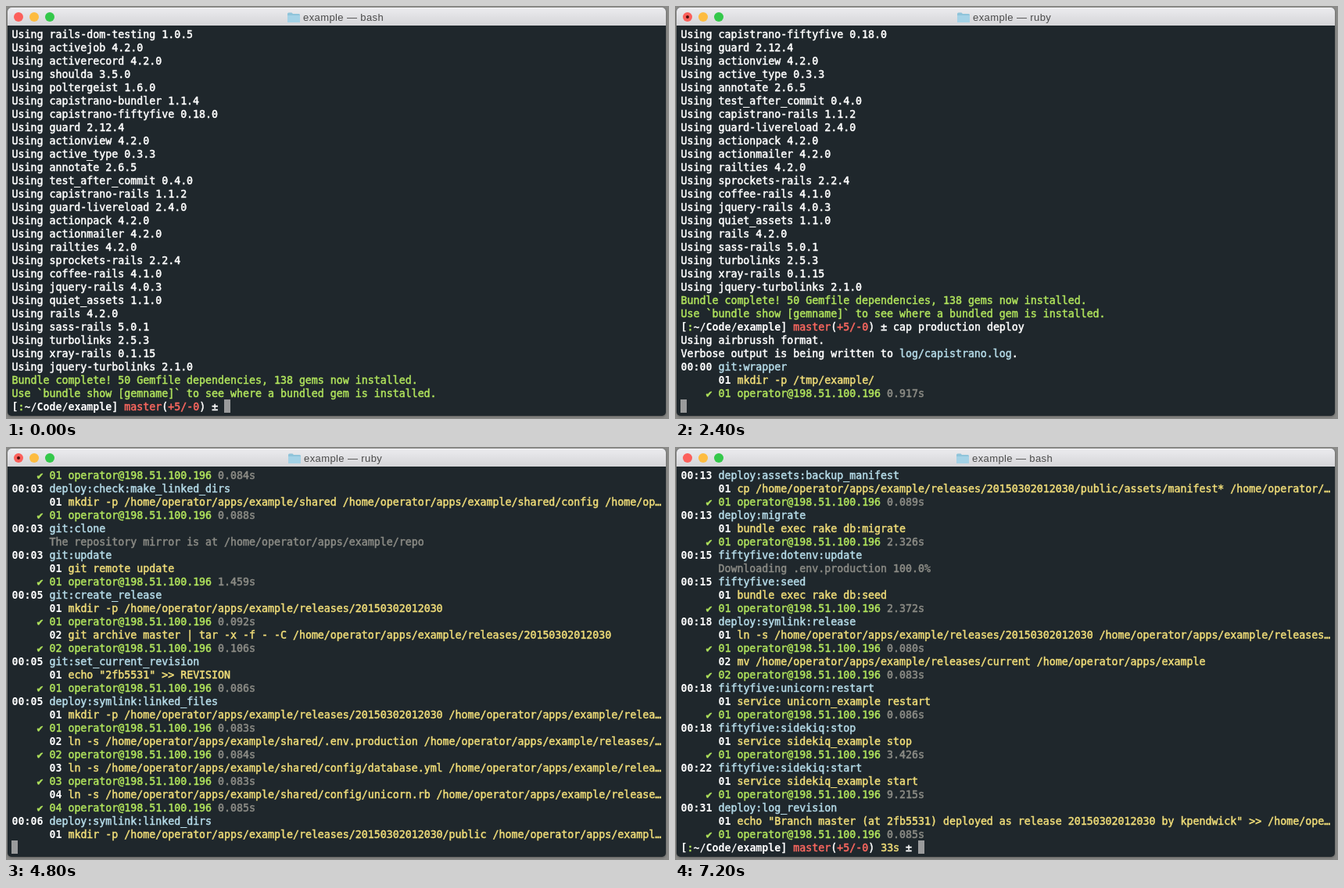
Recreate the animation shown at these times as an HTML page. Size 848 by 528 pixels, loop 9200 ms.

```html
<!DOCTYPE html>
<html lang="en">
<head>
<meta charset="utf-8">
<title>Terminal</title>
<style>
html, body { margin: 0; width: 100%; height: 100%; overflow: hidden; background: #8b8b89; }
#win { position: absolute; left: 2px; top: 2px; width: 842px; height: 522px; border-radius: 5px; background: #1f272c; overflow: hidden; box-shadow: 0 1px 3px rgba(0, 0, 0, .35); }
#bar { position: absolute; left: 0; top: 0; width: 100%; height: 23px; background: linear-gradient(#ebebee, #d5d5d8); border-top: 1px solid #f3f3f5; box-sizing: border-box; }
#bar i { position: absolute; top: 5px; width: 12px; height: 12px; border-radius: 50%; }
#dot { position: absolute; left: 12px; top: 9px; width: 4px; height: 4px; border-radius: 50%; background: #4d0d0c; }
#folder { position: absolute; top: 5px; left: 358px; }
#title { position: absolute; top: 4px; left: 378px; font: 13px/15px "Liberation Sans", Arial, sans-serif; letter-spacing: .4px; color: #4b4b4b; white-space: pre; }
#cursor { position: absolute; width: 8px; height: 17px; top: 501px; background: #9a9b9c; }
#out { position: absolute; left: 5.5px; top: 26px; margin: 0; font: 13.288px/17px "DejaVu Sans Mono", monospace; color: #fff; -webkit-text-stroke: .5px; }
#out div { height: 17px; white-space: pre; }
#out b { -webkit-text-stroke: 0; }
.g { color: #b0e35c; } .y { color: #efdc78; } .c { color: #b5dbe8; } .r { color: #f9675f; } .d { color: #8b8b85; }
.tick { display: inline-block; width: 8px; }
</style>
</head>
<body>
<div id="win">
  <div id="bar">
    <i style="left:8px;background:#fc605b"></i>
    <i style="left:28px;background:#fdbc40"></i>
    <i style="left:48px;background:#34c84a"></i>
    <div id="dot"></div>
    <svg id="folder" width="16" height="13"><path d="M0 2q0-1.500 1.500-1.500h4l1.500 1.500h7.500q1.500 0 1.500 1.500v8q0 1.500-1.500 1.500h-13q-1.500 0-1.500-1.500z" fill="#8fc4da"/><path d="M0 4h16v7.500q0 1.500-1.500 1.500h-13q-1.500 0-1.500-1.500z" fill="#a4d2e6"/></svg>
    <div id="title"></div>
  </div>
  <div id="cursor"></div>
  <pre id="out"></pre>
</div>
<script>
const $ = id => document.getElementById(id);
const span = (cls, s) => `<span class="${cls}">${s}</span>`;
const pad = n => String(n).padStart(2, '0');
const HOST = 'operator@198.51.100.196';
const APP = '/home/operator/apps/example';
const SHARED = APP + '/shared';
const STAMP = '20150302012030';
const REL = APP + '/releases/' + STAMP;
const COMMAND = 'cap production deploy';
const log = [];

const prompt = (typed, took = '') =>
  `<b>[</b>${span('g', ':')}<b>~/Code/example</b>] ${span('r', 'master')}(${span('r', '+5/-0')}) ${took}± ${typed}`;
const fit = s => s.length > 95 ? s.slice(0, 94) + '…' : s;
const note = s => log.push('      ' + span('d', s));

let step = 0;
function task(time, name) {
  step = 0;
  log.push(`<b>${time}</b> ${span('c', name)}`);
}
function run(cmd, secs) {
  const n = pad(++step);
  log.push(`      <b>${n}</b> ${span('y', fit(cmd).replace(/>/g, '&gt;'))}`);
  log.push(`    ${span('g', `<span class="tick">✔</span> ${n} ${HOST}`)} ${span('d', secs + 's')}`);
}
const link = (path, secs) => run(`ln -s ${SHARED}/${path} ${REL}/${path}`, secs);

`rails-dom-testing 1.0.5,activejob 4.2.0,activerecord 4.2.0,shoulda 3.5.0,poltergeist 1.6.0,capistrano-bundler 1.1.4,capistrano-fiftyfive 0.18.0,guard 2.12.4,actionview 4.2.0,active_type 0.3.3,annotate 2.6.5,test_after_commit 0.4.0,capistrano-rails 1.1.2,guard-livereload 2.4.0,actionpack 4.2.0,actionmailer 4.2.0,railties 4.2.0,sprockets-rails 2.2.4,coffee-rails 4.1.0,jquery-rails 4.0.3,quiet_assets 1.1.0,rails 4.2.0,sass-rails 5.0.1,turbolinks 2.5.3,xray-rails 0.1.15,jquery-turbolinks 2.1.0`
  .split(',').forEach(gem => log.push('Using ' + gem));
log.push(span('g', 'Bundle complete! 50 Gemfile dependencies, 138 gems now installed.'));
log.push(span('g', 'Use `bundle show [gemname]` to see where a bundled gem is installed.'));
const FIRST = log.length;
log.push(prompt(COMMAND));
log.push('Using airbrussh format.');
log.push(`Verbose output is being written to ${span('c', 'log/capistrano.log')}.`);

task('00:00', 'git:wrapper');
run('mkdir -p /tmp/example/', '0.917');
note('Uploading /tmp/example/git-ssh.sh 100.0%');
run('chmod +x /tmp/example/git-ssh.sh', '0.080');
task('00:01', 'git:check');
run('git ls-remote --heads git@bitbucket.org:karlpendwick/example.git', '1.806');
task('00:02', 'deploy:check:directories');
run(`mkdir -p ${SHARED} ${APP}/releases`, '0.083');
task('00:03', 'deploy:check:linked_dirs');
run(`mkdir -p ${SHARED}/public/assets ${SHARED}/log`, '0.084');
task('00:03', 'deploy:check:make_linked_dirs');
run(`mkdir -p ${SHARED} ${SHARED}/config ${SHARED}/config`, '0.088');
task('00:03', 'git:clone');
note(`The repository mirror is at ${APP}/repo`);
task('00:03', 'git:update');
run('git remote update', '1.459');
task('00:05', 'git:create_release');
run(`mkdir -p ${REL}`, '0.092');
run(`git archive master | tar -x -f - -C ${REL}`, '0.106');
task('00:05', 'git:set_current_revision');
run('echo "2fb5531" >> REVISION', '0.086');
task('00:05', 'deploy:symlink:linked_files');
run(`mkdir -p ${REL} ${REL}/config`, '0.083');
link('.env.production', '0.084');
link('config/database.yml', '0.083');
link('config/unicorn.rb', '0.085');
task('00:06', 'deploy:symlink:linked_dirs');
run(`mkdir -p ${REL}/public ${REL}/tmp`, '0.079');
link('public/assets', '0.082');
run(`rm -rf ${REL}/log`, '0.084');
link('log', '0.085');
link('tmp/pids', '0.087');
link('tmp/cache', '0.090');
link('tmp/sockets', '0.085');
link('public/system', '0.090');
task('00:07', 'bundler:install');
run(`bundle install --path ${SHARED}/bundle --without development test --deployment --quiet`, '1.212');
task('00:08', 'deploy:assets:precompile');
run('bundle exec rake assets:precompile', '4.318');
task('00:13', 'deploy:assets:backup_manifest');
run(`cp ${REL}/public/assets/manifest* ${REL}/assets_manifest_backup`, '0.089');
task('00:13', 'deploy:migrate');
run('bundle exec rake db:migrate', '2.326');
task('00:15', 'fiftyfive:dotenv:update');
note('Downloading .env.production 100.0%');
task('00:15', 'fiftyfive:seed');
run('bundle exec rake db:seed', '2.372');
task('00:18', 'deploy:symlink:release');
run(`ln -s ${REL} ${APP}/releases/current`, '0.080');
run(`mv ${APP}/releases/current ${APP}`, '0.083');
task('00:18', 'fiftyfive:unicorn:restart');
run('service unicorn_example restart', '0.086');
task('00:18', 'fiftyfive:sidekiq:stop');
run('service sidekiq_example stop', '3.426');
task('00:22', 'fiftyfive:sidekiq:start');
run('service sidekiq_example start', '9.215');
task('00:31', 'deploy:log_revision');
run(`echo "Branch master (at 2fb5531) deployed as release ${STAMP} by kpendwick" >> ${APP}/revisions.log`, '0.085');
log.push(prompt('', span('y', '33s') + ' '));

// Typing takes ticks 0-8; after that, the log line the cursor has reached at each tick.
const TYPING = 8, LAST = 36, TICK = 200, LOOP = 9200, ROWS = 29;
const reached = [29, 31, 33, 34, 35, 36, 39, 42, 45, 48, 51, 53, 56, 61, 68, 73,
  77, 81, 85, 88, 90, 93, 99, 104, 109, 115, 118, log.length - 1];

function draw(tick) {
  const typing = tick <= TYPING, done = tick === LAST, idle = typing || done;
  const row = typing ? FIRST : reached[tick - TYPING - 1];
  const typed = COMMAND.slice(0, Math.round(tick * COMMAND.length / TYPING));
  const rows = log.slice(row - ROWS + 1, done ? row + 1 : row);
  if (typing) rows.push(prompt(typed));
  $('out').innerHTML = rows.map(s => `<div>${s}</div>`).join('');
  const col = typing ? 34 + typed.length : done ? 38 : 0;
  $('cursor').style.left = 5 + col * 8 + 'px';
  $('title').textContent = 'example — ' + (idle ? 'bash' : 'ruby');
  $('title').style.left = (idle ? 378 : 379) + 'px';
  $('folder').style.left = (idle ? 358 : 359) + 'px';
  $('dot').hidden = idle;
}

const start = performance.now();
let shown = -1;
function loop() {
  const t = (performance.now() - start) % LOOP;
  const tick = Math.min(LAST, Math.floor(t / TICK));
  if (tick !== shown) draw(shown = tick);
  requestAnimationFrame(loop);
}
loop();
</script>
</body>
</html>
```
